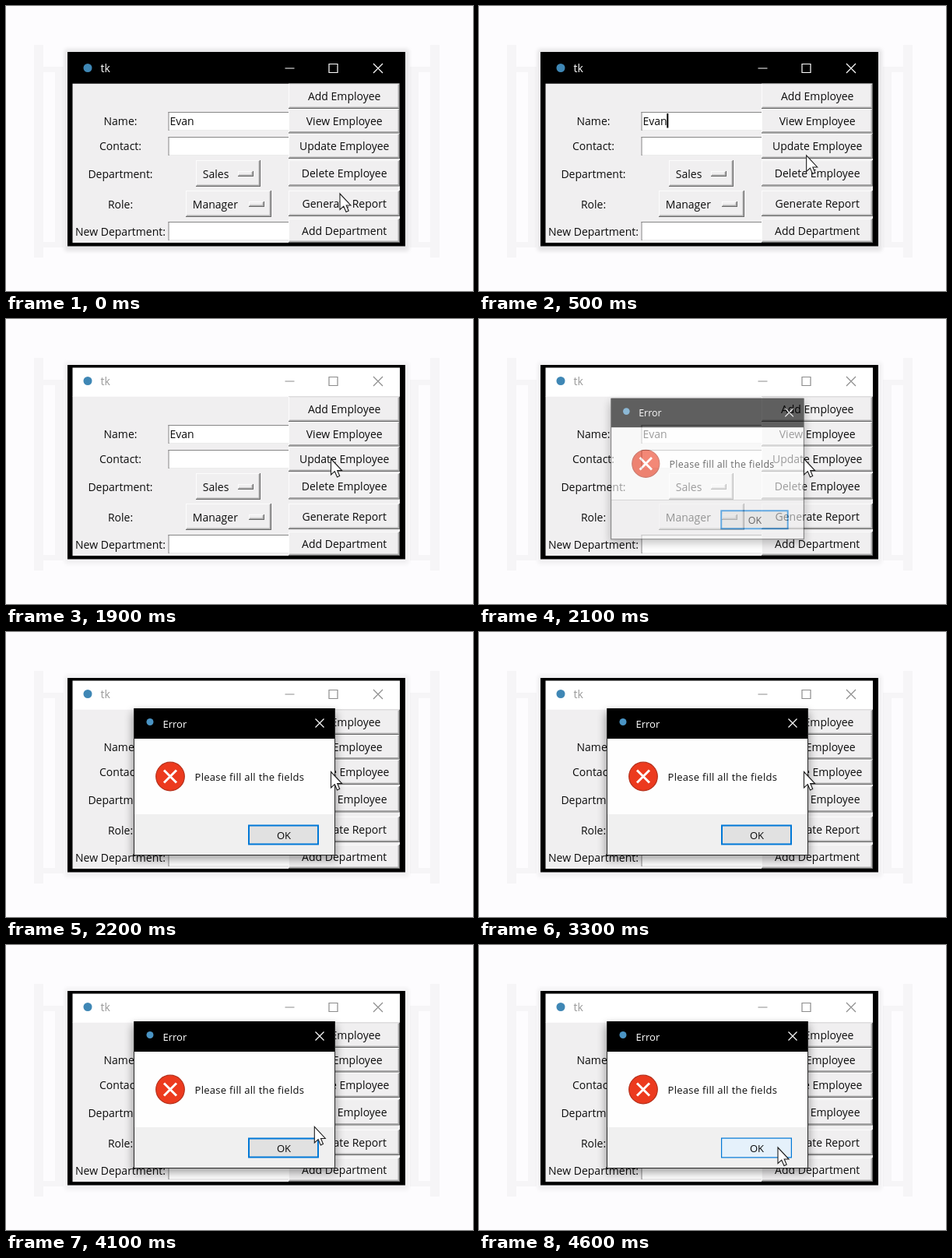
Animation of 600 by 366 pixels, one loop 5000 ms. Source, as an HTML page:

```html
<!DOCTYPE html>
<html lang="en">
<head>
<meta charset="utf-8">
<title>Employee form</title>
<style>
  html, body { margin: 0; width: 100%; height: 100%; overflow: hidden; background: #fdfcfe; }
  svg { display: block; width: 600px; height: 366px; }
  text { font: 14px "Open Sans", "Noto Sans", sans-serif; fill: #0c0c0c; }
  .mid { text-anchor: middle; }
  .small { font-size: 13px; }
  .line { fill: none; stroke-width: 1.2; }
</style>
</head>
<body>
<svg id="stage" viewBox="0 0 600 366" xmlns="http://www.w3.org/2000/svg">
  <defs>
    <filter id="soft" x="-20%" y="-20%" width="140%" height="140%"><feGaussianBlur stdDeviation="6"/></filter>
    <filter id="edge" x="-10%" y="-10%" width="120%" height="120%"><feGaussianBlur stdDeviation="2.5"/></filter>
    <path id="bracket" d="M36 50h12v28h26v232h-26v13h-12zM48 85v218h15v-218z" fill="#f6f5f7" fill-rule="evenodd"/>
  </defs>
  <rect width="600" height="366" fill="#fdfcfe"/>
  <use href="#bracket"/>
  <use href="#bracket" transform="translate(593 0) scale(-1 1)"/>
  <rect id="winShadow" x="75" y="55" width="443" height="260" rx="4" filter="url(#edge)"/>
  <rect x="79" y="59" width="434" height="249.500"/>
  <rect id="bar" x="85.5" y="62.5" width="420.5" height="37.500"/>
  <circle cx="105" cy="79.5" r="5.500" fill="#3f87b5"/>
  <text id="title" x="121.5" y="85">tk</text>
  <path id="controls" class="line" d="M358.5 80h12M415 74.500h11v11h-11zM472 74l12 12M484 74l-12 12"/>
  <rect x="85.5" y="99.700" width="420.5" height="204.300" fill="#f0eff0"/>
  <g id="form"></g>
  <rect id="caret" x="241.300" y="138" width="2" height="18.500"/>

  <g id="dialog">
    <rect x="163" y="103" width="261" height="189" opacity=".38" filter="url(#soft)"/>
    <rect x="164" y="98" width="259" height="189" fill="#2a2a2a"/>
    <rect x="165" y="98" width="257" height="39"/>
    <rect x="165" y="137" width="257" height="97" fill="#fefefe"/>
    <rect x="165" y="234" width="257" height="52" fill="#f0f0f0"/>
    <circle cx="185" cy="115.500" r="4.500" fill="#4a94c4"/>
    <text class="small" x="201.500" y="122.500" style="fill:#fff">Error</text>
    <path class="line" stroke="#fff" d="M397.500 111.500l11 11M408.500 111.500l-11 11"/>
    <circle cx="211" cy="185.500" r="18.300" fill="#ec3a1e" stroke="#b5301b" stroke-width="1.200"/>
    <path d="M203 177.500l16 16M219 177.500l-16 16" stroke="#fff" stroke-width="3"/>
    <text class="small" x="242.500" y="191" letter-spacing=".3">Please fill all the fields</text>
    <rect id="ok"/>
    <text class="small mid" x="357" y="265.500">OK</text>
  </g>
  <path id="cursor" d="M0 0V20.500L4.800 16.200L8 23.500L11.200 22L8.200 15H14Z" fill="#fff" stroke="#1c1c1c" stroke-width="1.100"/>
</svg>
<script>
const LOOP = 5000, STEP = 100;
const $ = id => document.getElementById(id);

function add(tag, attrs, text) {
  const el = document.createElementNS("http://www.w3.org/2000/svg", tag);
  for (const key in attrs) el.setAttribute(key, attrs[key]);
  if (text) el.textContent = text;
  $("form").append(el);
}

const rect = (x, y, width, height, fill) => add("rect", { x, y, width, height, fill });
const label = (text, x, y, cls = "") => add("text", { x, y, class: cls }, text);

function raised(x, y, w, h) {
  rect(x, y, w, h, "#696969");
  rect(x, y, w - 1.2, h - 1.2, "#fcfcfc");
  rect(x + 1, y + 1, w - 2.2, h - 2.2, "#a0a0a0");
  rect(x + 1, y + 1, w - 3.4, h - 3.4, "#f0eff0");
}

function entry(y) {
  rect(208.5, y, 156, 24, "#ececec");
  rect(208.5, y, 156, 1.2, "#8a8a8a");
  rect(208.5, y, 1.2, 24, "#8a8a8a");
  rect(209.7, y + 1.2, 155, 21.8, "#ffffff");
}

function menu(text, x, y, w, h) {
  raised(x, y, w, h);
  label(text, x + 8.8, y + 22.6);
  raised(x + w - 29, y + 14, 20, 7);
}

[["Name:", 152.5], ["Contact:", 185], ["Department:", 220.5], ["Role:", 259.8], ["New Department:", 294.5]]
  .forEach(([text, y]) => label(text, 147, y, "mid"));
[136, 168, 277].forEach(entry);
label("Evan", 210.5, 152.5);
menu("Sales", 244, 198, 83, 34);
menu("Manager", 231, 237, 110, 34);
[["Add Employee", 99.7, 32.3], ["View Employee", 132, 31.5], ["Update Employee", 164, 32],
 ["Delete Employee", 198, 33.5], ["Generate Report", 237, 33], ["Add Department", 273, 31]]
  .forEach(([text, y, h]) => {
    raised(363, y, 143, h);
    label(text, 434.7, y + h / 2 + 5.1, "mid");
  });

// Pointer stops: time, x, y
const path = [
  [0, 429, 241], [600, 420, 188], [700, 420, 188], [1000, 417.5, 179.5],
  [3300, 417.5, 179.5], [3700, 405, 215], [3900, 403, 219], [4400, 384, 260], [LOOP, 384, 260]
];

const clamp = v => Math.max(0, Math.min(1, v));
const ease = v => v * v * (3 - 2 * v);
const mix = (a, b, k) => a + (b - a) * k;

function pointer(t) {
  const i = path.findIndex((p, n) => n && t <= p[0]);
  const [t0, x0, y0] = path[i - 1], [t1, x1, y1] = path[i];
  const k = ease((t - t0) / (t1 - t0));
  return [mix(x0, x1, k), mix(y0, y1, k)];
}

function set(id, attrs) {
  for (const key in attrs) $(id).setAttribute(key, attrs[key]);
}

function draw(t) {
  const active = t < 1800;
  set("bar", { fill: active ? "#000" : "#fff" });
  set("winShadow", { opacity: active ? 0.09 : 0.045 });
  set("controls", { stroke: active ? "#fff" : "#8c8c8c" });
  $("title").style.fill = active ? "#fff" : "#999";

  const caretOn = (t >= 100 && t < 600) || (t >= 900 && t < 1500);
  set("caret", { opacity: caretOn ? 1 : 0 });

  const open = t < 2100 ? 0 : t < 2200 ? 0.6 : 1;
  set("dialog", {
    opacity: open,
    transform: `translate(293.5 192.5) scale(${mix(0.9, 1, open)}) translate(-293.5 -192.5)`
  });

  const hover = clamp((t - 4300) / 300);
  const line = mix(2, 1.2, hover), inset = line / 2;
  set("ok", {
    x: 311 + inset, y: 247.5 + inset, width: 91 - line, height: 26 - line,
    fill: `rgb(${mix(225, 229, hover)},${mix(225, 241, hover)},${mix(225, 251, hover)})`,
    stroke: "#0078d7", "stroke-width": line
  });

  set("cursor", { transform: `translate(${pointer(t).join(" ")})` });
}

const start = performance.now();
function tick() {
  const t = (performance.now() - start) % LOOP;
  draw(Math.floor(t / STEP) * STEP);
  requestAnimationFrame(tick);
}
tick();
</script>
</body>
</html>
```
